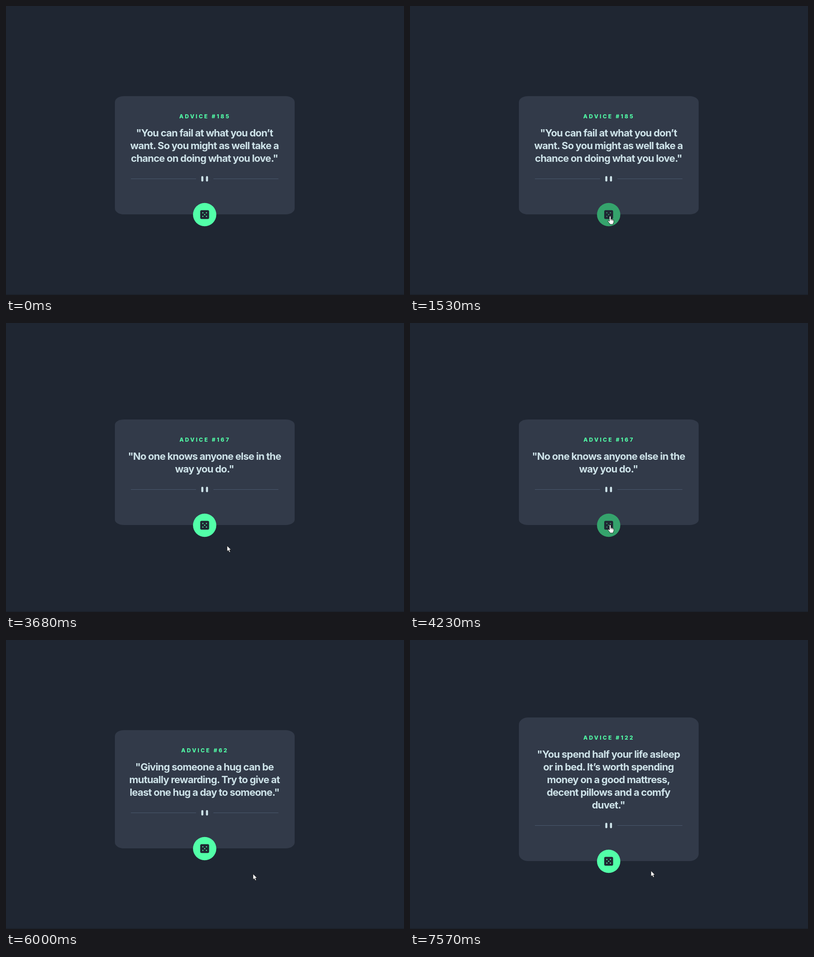
An HTML page that plays this animation: 877 by 638 pixels, repeating every 7970 ms.

```html
<!DOCTYPE html>
<html lang="en">
<head>
<meta charset="utf-8">
<title>Advice generator</title>
<style>
  html, body { margin: 0; width: 100%; height: 100%; overflow: hidden; background: #1f2632; }
  svg { display: block; }
  text { font-family: Inter, "Open Sans", sans-serif; text-anchor: middle; }
  #heading { font-size: 12px; font-weight: 800; letter-spacing: 3.2px; fill: #52ffa8; }
  #quote { font-size: 22px; font-weight: 700; letter-spacing: -0.8px; fill: #cee3e9; }
</style>
</head>
<body>
<svg width="877" height="638" viewBox="0 0 877 638">
  <rect width="877" height="638" fill="#1f2632"/>
  <rect y="636" width="877" height="2" fill="#1c212b"/>
  <rect id="card" x="240" width="396" rx="19.8" fill="#323a49"/>
  <text id="heading" x="438.3"></text>
  <g id="quote"></g>
  <g id="divider">
    <path d="M-162.5 0H-19M19.3 0H162.5" stroke="#4f5d74" stroke-width="0.9"/>
    <rect x="-7.4" y="-5.9" width="4.5" height="11.8" rx="2.2" fill="#cee3e9"/>
    <rect x="2.9" y="-5.9" width="4.5" height="11.8" rx="2.2" fill="#cee3e9"/>
  </g>
  <g id="button">
    <circle r="25.7"/>
    <rect x="-9.8" y="-9.8" width="19.6" height="19.6" rx="3.2" fill="#202733"/>
    <path d="M-4 -4h0M4 -4h0M0 0h0M-4 4h0M4 4h0" stroke="currentColor" stroke-width="2.6" stroke-linecap="round"/>
  </g>
  <g id="cursor" fill="#fff" stroke="#111" stroke-width="0.8" stroke-linejoin="round">
    <path id="arrow" d="M0 0V12.6L2.9 10L5 14.6L7.2 13.6L5.2 9.2H9Z"/>
    <g id="hand">
      <path d="M-1.5 1.5Q-1.5 0 0 0T1.5 1.5V6.5Q3.8 5.6 4 7.2Q6 6.4 6.2 8Q8 7.4 8 9V13Q7.5 15 6.5 16V18H-.8V16.5L-4.8 11.5Q-5.3 9.6 -3.6 9.6L-1.5 11.5Z"/>
      <path d="M1.5 6.5v3M4 7.2v2.8M6.2 8v2.4" fill="none"/>
    </g>
  </g>
  <circle id="click" r="9" fill="#ff0" fill-opacity="0.45"/>
</svg>
<script>
const LOOP = 7970, CENTER_X = 437.75, CENTER_Y = 329.5;
const LINE = 28, RADIUS = 25.7;

const slides = [
  { at: 0, id: 185, lines: ['"You can fail at what you don’t', 'want. So you might as well take a', 'chance on doing what you love."'] },
  { at: 2730, id: 167, lines: ['"No one knows anyone else in the', 'way you do."'] },
  { at: 5330, id: 62, lines: ['"Giving someone a hug can be', 'mutually rewarding. Try to give at', 'least one hug a day to someone."'] },
  { at: 7370, id: 122, lines: ['"You spend half your life asleep', 'or in bed. It’s worth spending', 'money on a good mattress,', 'decent pillows and a comfy', 'duvet."'] }
];

const linear = u => u;
const easeOut = u => u * (2 - u);
const smooth = u => u * u * (3 - 2 * u);

// Pointer legs, sampled in a fixed number of steps
const legs = [
  { start: 130, end: 900, steps: 12, from: [869, 646], to: [581, 546], ease: linear },
  { start: 970, end: 1530, steps: 9, from: [581, 546], to: [441, 464], ease: easeOut },
  { start: 2450, end: 3000, steps: 8, from: [441, 464], to: [488.5, 493], ease: smooth },
  { start: 3680, end: 4370, steps: 11, from: [488.5, 493], to: [430.5, 435], ease: smooth },
  { start: 5050, end: 5470, steps: 7, from: [430.5, 435], to: [548, 518.5], ease: smooth },
  { start: 6000, end: 6560, steps: 9, from: [548, 518.5], to: [440, 457], ease: smooth },
  { start: 7090, end: 7570, steps: 8, from: [440, 457], to: [531, 509.5], ease: t => (smooth(t) + t) / 2 }
];
const clicks = [[2120, 2250], [4700, 4770], [6760, 6830]];

const el = id => document.getElementById(id);
const place = (id, x, y) => el(id).setAttribute('transform', `translate(${x} ${y})`);
const show = (id, on) => el(id).setAttribute('visibility', on ? 'visible' : 'hidden');
const latest = (list, key, t) => list.filter(item => item[key] <= t).pop();

let current;
function showSlide(slide) {
  const height = 177 + LINE * slide.lines.length;
  const top = CENTER_Y - height / 2;
  const buttonY = top + height + 0.5;
  if (slide !== current) {
    current = slide;
    el('card').setAttribute('y', top);
    el('card').setAttribute('height', height);
    el('card').setAttribute('ry', height * 0.05);
    el('heading').setAttribute('y', top + 48.5);
    el('heading').textContent = `ADVICE #${slide.id}`;
    el('quote').innerHTML = slide.lines.map((line, i) =>
      `<text x="${CENTER_X - 0.4}" y="${top + 89 + i * LINE}">${line}</text>`).join('');
    place('divider', CENTER_X, top + height - 78.5);
    place('button', CENTER_X, buttonY);
  }
  return buttonY;
}

function pointerAt(t) {
  const leg = latest(legs, 'start', t);
  if (!leg) return null;
  const interval = (leg.end - leg.start) / (leg.steps - 1);
  const step = Math.floor((t - leg.start) / interval + 1e-6) + 1;
  const u = leg.ease(Math.min(1, step / leg.steps));
  return leg.from.map((value, i) => value + (leg.to[i] - value) * u);
}

function render(t) {
  const buttonY = showSlide(latest(slides, 'at', t));
  const pointer = pointerAt(t);
  const hover = !!pointer && Math.hypot(pointer[0] - CENTER_X, pointer[1] - buttonY) < RADIUS;
  const color = hover ? '#35a36c' : '#52ffa8';
  el('button').setAttribute('fill', color);
  el('button').setAttribute('color', color);
  show('arrow', pointer && !hover);
  show('hand', hover);
  show('click', pointer && clicks.some(([from, to]) => t >= from && t < to));
  if (pointer) {
    place('cursor', ...pointer);
    place('click', ...pointer);
  }
}

const origin = performance.now();
function tick() {
  render((performance.now() - origin) % LOOP);
  requestAnimationFrame(tick);
}
tick();
</script>
</body>
</html>
```
